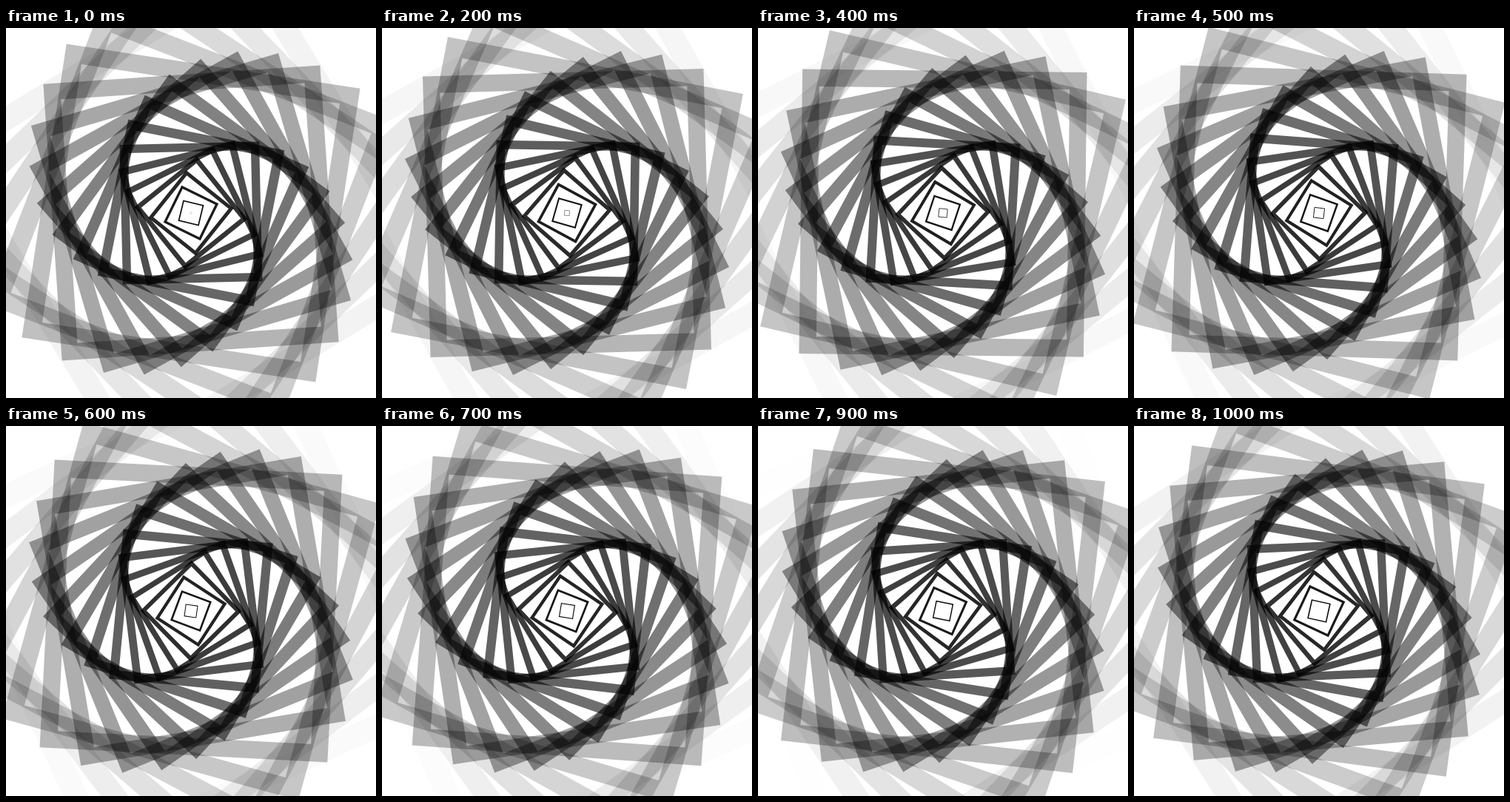
Recreate the animation shown at these times as an HTML page with a canvas. Size 500x500 px, loop 1100 ms.

```html
<!DOCTYPE html>
<html lang="en">
<head>
<meta charset="utf-8">
<title>Square spiral</title>
<style>
  html, body { margin: 0; width: 100%; height: 100%; overflow: hidden; background: #fff; }
  canvas { display: block; }
</style>
</head>
<body>
<canvas width="500" height="500"></canvas>
<script>
const ctx = document.querySelector('canvas').getContext('2d');
const COUNT = 20;                     // squares alive at once
const STEPS = 11, STEP_MS = 100;      // motion advances in held steps
const GROWTH = 25;                    // side gained per generation
const TURN = 12.5 * Math.PI / 180;    // rotation per generation
const STROKE = 1.6;                   // line width gained per generation

function drawSquare(age) {
  const side = age * GROWTH;
  ctx.save();
  ctx.translate(250, 250);
  ctx.rotate(age * TURN);
  ctx.globalAlpha = 1 - age / COUNT;
  ctx.lineWidth = age * STROKE;
  ctx.strokeRect(-side / 2, -side / 2, side, side);
  ctx.restore();
}

function draw() {
  const step = Math.floor(performance.now() / STEP_MS) % STEPS;
  ctx.fillStyle = '#fff';
  ctx.fillRect(0, 0, 500, 500);
  // A new square is already one step old when it first shows.
  for (let i = 0; i < COUNT; i++) drawSquare(i + (step + 1) / STEPS);
  requestAnimationFrame(draw);
}
draw();
</script>
</body>
</html>
```
